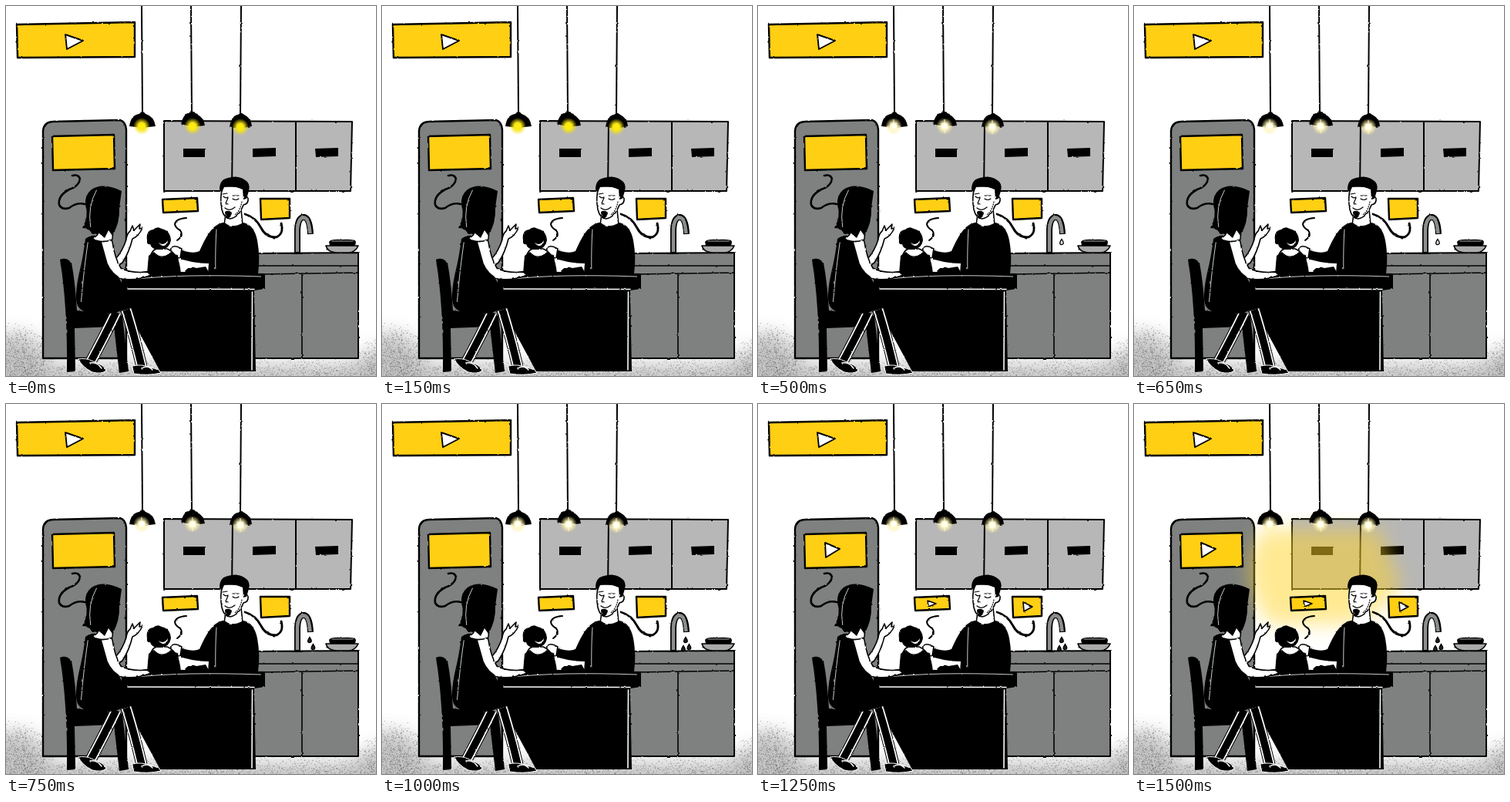
These frames come from a looping animation (480x480 px, 1750 ms). An HTML page:

```html
<!DOCTYPE html>
<html lang="en">
<head>
<meta charset="utf-8">
<title>Kitchen</title>
<style>
html, body { margin: 0; width: 100%; height: 100%; overflow: hidden; background: #fff; }
svg { display: block; width: 100vw; height: 100vh; }
.ink { fill: none; stroke: #000; stroke-width: 2; stroke-linecap: round; stroke-linejoin: round; }
.solid { fill: #000; stroke: none; }
.skin { fill: #fff; stroke-width: 1.6; }
.grey { fill: #7e8180; }
.sign { fill: #ffcf14; stroke-width: 2.4; }
.play { fill: #fff; stroke-width: 1.9; }
.strand { stroke: #fff; stroke-width: .8; }
</style>
</head>
<body>
<svg viewBox="0 0 480 480">
  <defs>
    <filter id="rough" filterUnits="userSpaceOnUse" x="0" y="0" width="480" height="480" color-interpolation-filters="sRGB">
      <feTurbulence type="fractalNoise" baseFrequency=".16" numOctaves="2" seed="4"/>
      <feDisplacementMap in="SourceGraphic" scale="2" xChannelSelector="R" yChannelSelector="G"/>
    </filter>
    <filter id="soft" filterUnits="userSpaceOnUse" x="-40" y="60" width="560" height="460"><feGaussianBlur stdDeviation="12"/></filter>
    <radialGradient id="warm">
      <stop offset="0" stop-color="#fff200"/><stop offset=".4" stop-color="#f8e81c"/>
      <stop offset="1" stop-color="#f6e000" stop-opacity="0"/>
    </radialGradient>
    <radialGradient id="pale">
      <stop offset="0" stop-color="#fff"/><stop offset=".35" stop-color="#fffbd0"/>
      <stop offset="1" stop-color="#ffe98a" stop-opacity="0"/>
    </radialGradient>
  </defs>

  <path d="M-20 425H25Q55 440 60 465H440Q462 450 500 440V510H-20Z" fill="#888" opacity=".5" filter="url(#soft)"/>
  <path id="floor" fill="none" stroke="#555" stroke-opacity=".55"/>

  <g class="ink" filter="url(#rough)">
    <!-- fridge, cabinets, counter -->
    <path class="grey" d="M48 457V162Q49 151 60 150L148 148Q155 150 156 160V457Z" stroke-width="2.4"/>
    <path d="M86 220Q95 218 96 225Q94 234 82 238Q67 246 69 258Q73 265 82 262Q92 254 102 257" stroke-width="2.6"/>
    <path d="M205 149L449 150L447 240H205ZM294 150L293 240M376 150V240" fill="#b7b7b7"/>
    <path class="solid" d="M230 185H258V196H230ZM320 185L350 184V195L320 196ZM401 185L431 184V195L402 196Z"/>
    <path class="grey" d="M318 321L457 320V457H318Z"/>
    <path d="M327 337H457M327 348L457 346M384 348V457" stroke-width="1.6"/>
    <path d="M378 320V290Q379 273 387 274Q394 275 395 296" stroke-width="8" stroke-linecap="butt"/>
    <path d="M378 319V290Q379 274 387 274.500Q393 276 394.500 295" stroke="#8b8d8d" stroke-width="4.600" stroke-linecap="butt"/>
    <path d="M372 321H384"/>
    <path d="M415 311H457Q453 320 444 320H428Q417 319 415 311Z" fill="#aaa" stroke-width="1.6"/>
    <path class="solid" d="M419 306Q421 302 436 303Q453 302 454 306L453 311H420Z"/>
    <path d="M423 305H450" stroke="#aaa" stroke-width="1"/>
    <path d="M176 0L177 139M240 0L241 139M305 0L304 141"/>
  </g>

  <path id="glow" d="M166 162H318L346 235Q315 285 265 286H178Q146 250 150 200Z" fill="#ffd42a" opacity=".5" filter="url(#soft)"/>

  <g class="ink" filter="url(#rough)">
    <path class="solid" d="M160 156Q162 141 173 140Q177 134 181 140Q192 143 194 156L177 158ZM227 153Q230 140 237 139Q242 134 247 140Q257 145 258 155L242 157ZM290 157Q292 143 300 141Q304 136 309 141Q318 145 319 156L304 159Z"/>
    <path d="M234 275Q220 276 219 283Q220 288 226 291Q231 298 222 304"/>
    <path d="M310 270Q324 274 331 288Q337 300 350 300Q361 296 357 282" stroke-width="2.8"/>
    <path class="sign" d="M14 24L167 21V66L15 67Z"/>
    <path class="play" d="M77 37L100 45L79 56Z"/>
    <path class="sign" d="M60 169L140 167L141 211L61 213Z"/>
    <path class="sign" d="M203 251L248 249L249 266L204 268Z" stroke-width="2"/>
    <path class="sign" d="M330 250H368V275L331 277Z" stroke-width="2"/>
    <g id="plays" class="play">
      <path d="M87 180L106 188L88 199Z"/>
      <path d="M220 255L231 259L221 263Z" stroke-width="1.400"/>
      <path d="M344 257L356 263L345 269Z" stroke-width="1.600"/>
    </g>

    <!-- man -->
    <path class="skin" d="M285 270L283 284Q295 291 307 284L305 264Z"/>
    <path class="skin" d="M281 234Q277 250 280 264Q283 276 291 276Q302 274 308 258Q315 257 314 249Q312 246 309 249V234Z"/>
    <path class="solid" d="M277 238Q277 225 288 223Q300 219 309 225Q318 230 315 240L312 250L308 251L307 238Q293 232 283 235L280 242Z"/>
    <path d="M282 247Q285 250 288 248M294 250Q298 253 302 250M281 244L287 243M294 246L302 246M288 249L285 256L288 257M284 262Q290 267 297 261" stroke-width="1.200"/>
    <path class="solid" d="M284 267Q289 264 293 268Q292 275 288 275Q284 273 284 267Z"/>
    <path d="M306 254Q304 265 297 271" stroke-width="1.200" stroke-dasharray="1 2"/>
    <path class="solid" d="M274 284Q282 279 285 282Q294 289 308 281Q322 284 326 304Q330 326 327 347H262L263 334Q241 334 217 325L219 313Q240 323 251 318Q263 290 274 284Z"/>
    <path id="sweater" class="strand"/>
    <path class="skin" d="M228 315Q218 309 214 314Q213 321 217 325L226 327Z"/>

    <!-- child -->
    <path class="skin" d="M186 345Q183 323 194 315H209Q224 321 226 346Z" stroke-width="1.200"/>
    <path class="solid" d="M183 347L185 324L192 319Q202 330 214 319L223 324L226 347Z"/>
    <path class="solid" d="M183 304Q181 291 191 290Q196 285 202 289Q213 291 214 304Q212 315 201 316Q189 317 187 309Q182 310 183 304Z"/>
    <path d="M198 307Q205 312 210 304L209 309Q203 314 198 307Z" fill="#fff" stroke="none"/>
    <path class="solid" d="M232 344Q238 336 247 340L259 338L264 347H235Z"/>

    <!-- table -->
    <path class="solid" d="M150 349L182 344L336 347V367L322 369L324 474H200L160 400L150 368Z"/>
    <path d="M158 367L322 367.500M319.500 371L319 472" stroke="#fff" stroke-width="1.600"/>
    <path id="wood" class="strand" stroke-width=".9"/>

    <!-- chair and woman -->
    <path class="solid" d="M70 329Q78 325 85 333Q90 360 92 395L151 402L159 474L147 476L140 416L89 418L90 474L79 475Q80 390 70 329Z"/>
    <g id="legs" stroke-linecap="butt"></g>
    <path class="solid" d="M94 458Q104 456 113 461Q128 466 130 473Q124 478 112 475Q98 468 94 458ZM164 467Q176 464 187 469Q199 471 201 476Q184 480 166 477Z" style="stroke:#fff;stroke-width:1"/>
    <path d="M109 463Q118 461 124 470M176 470Q184 465 190 472" stroke="#fff" stroke-width="1.500"/>
    <path class="skin" d="M143 327Q151 318 156 303Q157 295 161 292L164 285L166 291L174 283L173 289L177 288Q172 299 164 302Q160 319 151 333L145 337Z"/>
    <path class="solid" d="M103 302Q113 294 126 301Q128 328 142 345Q158 370 161 392Q147 397 130 400Q101 402 93 389Q88 378 95 346Q100 326 103 302Z"/>
    <path id="dress" class="strand"/>
    <path class="skin" d="M122 302Q133 295 138 306Q141 327 149 340Q162 347 183 345L188 349Q169 357 150 354Q137 348 131 334Z"/>
    <path class="skin" d="M121 290Q120 299 112 301Q122 309 138 303L139 289Z" stroke-width="1"/>
    <path class="solid" d="M111 238Q126 228 150 240L147 262Q148 281 138 298L133 291L128 301L121 295L112 296L107 289L99 288Q108 272 103 258Q102 245 111 238Z"/>
    <path id="hair" class="strand"/>
  </g>

  <g id="warmBulbs"></g>
  <g id="paleBulbs"></g>
  <g id="drops" stroke="#000" stroke-width="1.300"></g>
</svg>
<script>
const STEP = 250, STEPS = 7;
const $ = id => document.getElementById(id);
let seed = 7;
const rnd = () => (seed = seed * 16807 % 2147483647) / 2147483647;
const clamp = v => Math.max(0, Math.min(1, v));

// Loose strokes spread between two quadratic curves
function strands(a, b, n, jitter = 2) {
  let d = '';
  for (let i = 0; i < n; i++) {
    const p = a.map((v, k) => (v + (b[k] - v) * (i + .5) / n + (rnd() - .5) * jitter).toFixed(1));
    d += `M${p[0]} ${p[1]}Q${p.slice(2)} ${p.slice(4)}`;
  }
  return d;
}

$('hair').setAttribute('d',
  strands([117, 238, 104, 260, 108, 286], [144, 242, 142, 270, 132, 294], 10) +
  strands([112, 243, 106, 255, 109, 268], [138, 238, 120, 250, 120, 276], 5));
$('dress').setAttribute('d',
  strands([105, 308, 100, 340, 96, 382], [123, 306, 128, 350, 152, 388], 11, 3) +
  strands([99, 350, 100, 378, 116, 394], [128, 340, 142, 362, 154, 386], 7, 4));
$('sweater').setAttribute('d',
  strands([273, 289, 268, 310, 268, 340], [318, 289, 325, 315, 323, 341], 13, 4) +
  strands([229, 320, 246, 327, 262, 315], [228, 325, 246, 331, 264, 326], 3) +
  strands([278, 291, 292, 298, 306, 288], [278, 312, 296, 322, 314, 306], 5, 4));
$('wood').setAttribute('d',
  strands([165, 352, 230, 347, 330, 352], [160, 363, 240, 365, 329, 363], 4, 5) +
  strands([190, 353, 220, 359, 252, 355], [245, 353, 275, 361, 310, 356], 3));

for (const d of ['M143 397Q128 428 108 465', 'M156 394Q166 425 177 472'])
  $('legs').innerHTML += ['#000 15', '#fff 13', '#000 9.5'].map(s => {
    const [color, width] = s.split(' ');
    return `<path d="${d}" stroke="${color}" stroke-width="${width}"/>`;
  }).join('');

// Grainy floor
let grain = '';
for (let i = 0; i < 15000; i++) {
  const x = rnd() * 480, y = 400 + rnd() * 80;
  const left = x < 50 ? (y - 407 - Math.max(0, x - 28)) / 65 : 0;
  const right = x > 455 ? (y - 424 - (480 - x) * .6) / 55 : 0;
  if (rnd() < clamp(Math.max(left, right, (y - 455) / 45)) * .75)
    grain += `M${x.toFixed(1)} ${y.toFixed(1)}h1`;
}
$('floor').setAttribute('d', grain);

for (const [x, y] of [[176, 156], [242, 156], [304, 157]]) {
  $('warmBulbs').innerHTML += `<circle cx="${x}" cy="${y}" r="11" fill="url(#warm)"/>`;
  let rays = '';
  for (let a = 0; a < 8; a++) {
    const r = a % 2 ? 6 : 9, t = a * Math.PI / 4;
    rays += `M${x} ${y}l${(r * Math.cos(t)).toFixed(1)} ${(r * Math.sin(t)).toFixed(1)}`;
  }
  $('paleBulbs').innerHTML += `<circle cx="${x}" cy="${y}" r="11" fill="url(#pale)"/>` +
    `<path d="${rays}" stroke="#fff8c8" stroke-width="1"/><circle cx="${x}" cy="${y}" r="3.5" fill="#fffef0"/>`;
}

const drop = (x, y, fill) =>
  `<path d="M${x} ${y - 3.5}q3.500 5 1.500 6.500q-3 1.500 -4 -1q0 -2 2.500 -5.500Z" fill="${fill}"/>`;
const dropSpots = [[394, 306], [398.5, 315], [391, 317]];

let shown = -1;
function draw(now) {
  const step = Math.floor(now / STEP) % STEPS;
  if (step !== shown) {
    shown = step;
    const show = (id, on) => $(id).style.display = on ? '' : 'none';
    show('warmBulbs', step === 0);
    show('paleBulbs', step > 0);
    show('plays', step > 4);
    show('glow', step === 6);
    const count = Math.max(0, Math.min(3, step - 1));
    $('drops').innerHTML = dropSpots.slice(0, count)
      .map(([x, y]) => drop(x, y, count === 1 ? '#ddd' : '#222')).join('');
  }
}
const start = performance.now();
function tick() {
  draw(performance.now() - start);
  requestAnimationFrame(tick);
}
tick();
</script>
</body>
</html>
```
